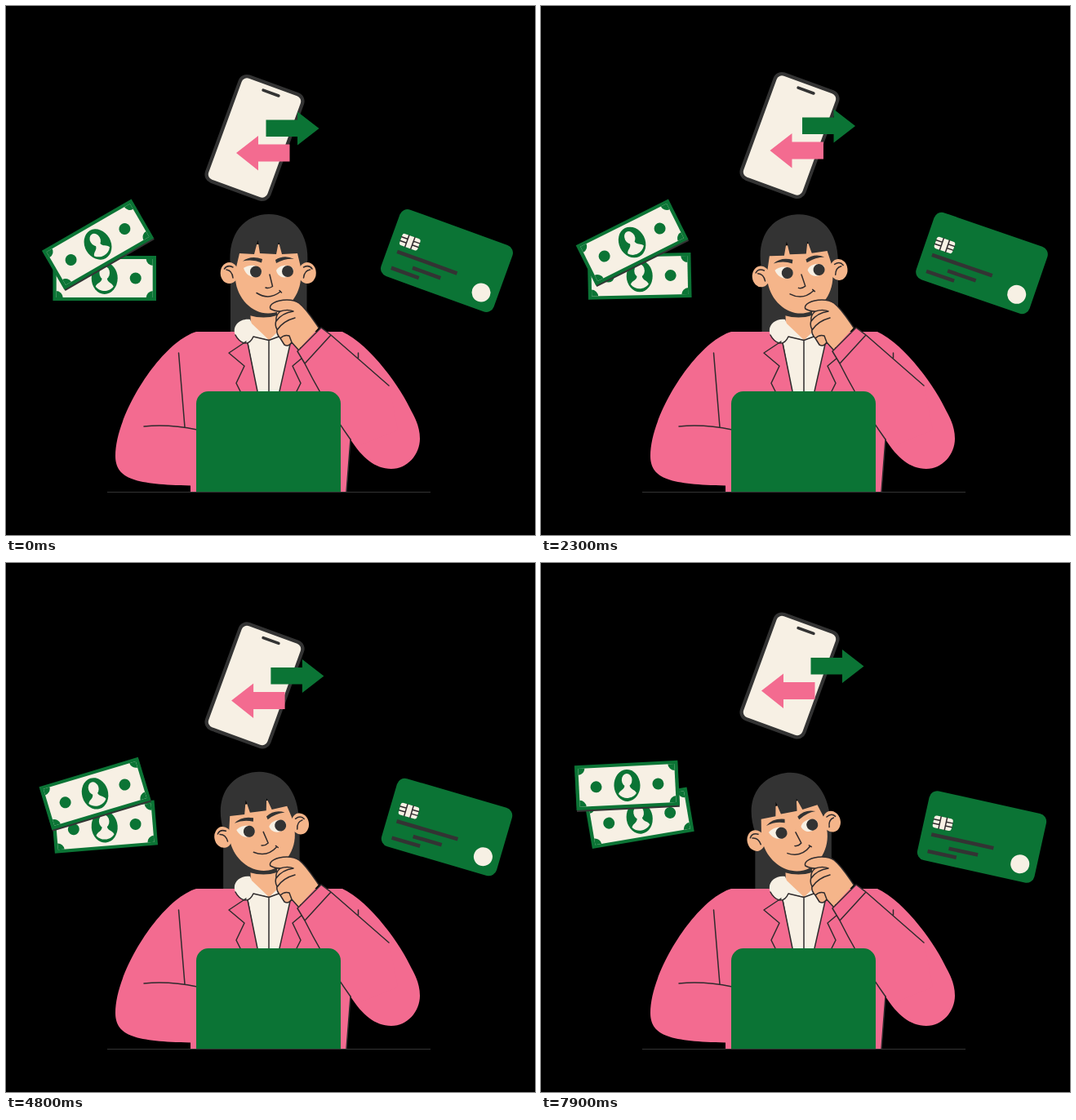
Animation, 648 px wide and 648 px high, one loop 8 s. Source, as an HTML page:

```html
<!DOCTYPE html>
<html lang="en">
<head>
<meta charset="utf-8">
<title>Choosing how to pay</title>
<style>
html, body { margin: 0; width: 100%; height: 100%; overflow: hidden; background: #000; }
svg { display: block; width: 100vw; height: 100vh; }
.green { fill: #0b7435; }
.pink { fill: #f36b90; }
.cream { fill: #f7f0e4; }
.skin { fill: #f5b58a; }
.dark { fill: #333; }
.line { fill: none; stroke: #2f2b2d; stroke-width: 1.5; stroke-linecap: round; stroke-linejoin: round; }
.bar { fill: none; stroke: #333; stroke-width: 4.6; }
</style>
</head>
<body>
<svg viewBox="0 0 648 648">
  <defs>
    <clipPath id="paper"><rect x="-59" y="-23.500" width="118" height="47"/></clipPath>
    <g id="bill">
      <rect class="green" x="-63.300" y="-27.500" width="126.600" height="55"/>
      <rect class="cream" x="-59" y="-23.500" width="118" height="47"/>
      <g class="green">
        <g clip-path="url(#paper)">
          <circle cx="-59.500" cy="-24" r="8.500"/><circle cx="59.500" cy="-24" r="8.500"/>
          <circle cx="-59.500" cy="24" r="8.500"/><circle cx="59.500" cy="24" r="8.500"/>
        </g>
        <circle cx="-38" r="7"/><circle cx="38" r="7"/>
        <ellipse rx="16" ry="19.500"/>
      </g>
      <ellipse class="cream" cy="-6.500" rx="6.300" ry="8"/>
      <path class="cream" d="M-11 10C-9 5-4 6-3 0H3C4 6 9 5 11 10C8 14 4 15.500 0 15.500S-8 14-11 10Z"/>
    </g>
    <g id="ear">
      <ellipse class="skin" cx="273.500" cy="327" rx="10.800" ry="13"/>
      <path class="line" d="M267.500 322Q271 316.500 278 320M270 323Q277 324 278 333"/>
    </g>
  </defs>

  <g id="low"><use href="#bill"/></g>
  <g id="high">
    <rect class="dark" x="-63" y="-25.500" width="126" height="55"/>
    <use href="#bill"/>
  </g>

  <g id="phone">
    <g transform="translate(304.500 161.500) rotate(20)">
      <rect class="dark" x="-42.700" y="-70.300" width="85.400" height="140.600" rx="11"/>
      <rect class="cream" x="-38.400" y="-66" width="76.800" height="132" rx="7"/>
      <path class="bar" d="M-10-58.500H10" style="stroke-width:3.6;stroke-linecap:round"/>
    </g>
  </g>
  <path id="send" class="green" d="M318.500 139.500H357V129.500L383.500 150L357 170.500V160H318.500Z"/>
  <path id="receive" class="pink" d="M347.500 169.500H309V159L282 180L309 201.500V190.500H347.500Z"/>

  <g id="card">
    <rect class="green" x="-73.400" y="-43.300" width="146.800" height="86.600" rx="10"/>
    <rect class="cream" x="-62" y="-13.500" width="23.500" height="15" rx="3"/>
    <path class="line" d="M-62-8.500H-54V-3.500H-62M-38.500-8.500H-46.500V-3.500H-38.500M-54-13.500V1.500M-46.500-13.500V1.500"/>
    <path class="bar" d="M-61 10.300H17M-61 31.500H-25M-36.500 22.600H0"/>
    <circle class="cream" cx="52.800" cy="22.300" r="11.500"/>
  </g>

  <path id="mane" class="dark" d="M275 318H368.500V402H275Z"/>
  <path class="skin" d="M299 370H350V406L322 410L300 390Z"/>
  <path class="dark" d="M294 366L298 379Q316 384 332 379V366Z"/>
  <path class="pink" d="M233 399C190 412 134 500 134 551C134 580 160 586 226 587.500V596H417L422 531C436 553 452 567 472 567C492 567 507 549 507 530C507 517 502 506 497 497C485 470 447 415 412 399H349L335 473H308L294 399Z"/>
  <path class="cream" d="M295 404L303 404L322 409.500L337 395L350 407L335 473H308Z"/>
  <path class="cream" d="M281 403C276 391 288 382 299 384L301 389L322 409L303 405L300 411Q295 415 289 412Z"/>
  <path class="line" d="M281 403Q285 411 292 413Q299 414 303 405L322 409.500L334 405M322 409V472M296 413L308 472M349 410L335 472
    M294 411L273 425L292 441L282 462L287 472M349 411L370 425L351 441L361 462L356 472"/>
  <path class="line" d="M211.500 425L219 516M169 515Q200 512 234 519M422 531L417 595"/>

  <g id="head">
    <path class="skin" d="M281 292V335C283 358 301 376.500 321 376.500C341 376.500 359 358 361 335V292Z"/>
    <path class="dark" d="M275 318C271 278 293 255 322 255S373 278 369 318L361 320L357 303L338 304L334 289L331 304L311 303L308.500 287L304 304L286 303L282 320Z"/>
    <use href="#ear"/>
    <use href="#ear" transform="matrix(-1 0 0 1 642.500 0)"/>
    <path class="dark" d="M290 312.500Q300 305 314 310L313 314.500Q302 309.500 290 312.500ZM330 311Q341 304 353 310Q342 309 331 315Z"/>
    <g id="eyes">
      <path class="cream" d="M291 321C297 316 310 316 313 325C312 334 296 336 291 321ZM331 324C335 316 348 316 352 322C350 335 334 336 331 324Z"/>
      <circle class="dark" cx="306" cy="325.500" r="7"/>
      <circle class="dark" cx="345" cy="325" r="7"/>
    </g>
    <path class="line" d="M323 329L326.500 343.500Q322 346.500 318 345M307 351.500Q322 361 336 350M335 348.500L337.500 351"/>
  </g>

  <path class="skin" d="M324 371C321 366 331 360 344 360Q354 360 359 364C368 371 376 384 383 394L358 421L350 412Q346 418 341 415L336 407Q331 402 332 396Q329 391 331 385Q330 379 336 374Q329 374 324 371Z"/>
  <path class="line" d="M358 421L350 412Q346 418 341 415L336 407Q331 402 332 396Q329 391 331 385Q330 379 336 374Q329 374 324 371C321 366 331 360 344 360Q354 360 359 364C368 371 376 384 383 394M336 374Q345 371 352 374M331 386Q338 376 352 374M332 397Q339 386 354 382M336 407Q341 402 347 404L350 412"/>
  <path class="pink" d="M386 394L398 402L469 465L480 520L430 540L366 438L357 423Z"/>
  <path class="line" d="M398 403L386 394L357 423L366 438L398 403L469 465M366 438C381 468 402 503 422 531M431.500 425V431"/>

  <rect class="green" x="233" y="472" width="177" height="145" rx="15"/>
  <path d="M100 596H540V620H100Z"/>
  <path d="M124 595.500H520" stroke="#333"/>
</svg>
<script>
const LOOP = 8000, STEP = 100, SWING = 11000;
const place = (id, value) => document.getElementById(id).setAttribute("transform", value);
const pose = (x, y, angle) => `translate(${x} ${y}) rotate(${angle})`;

function draw(t) {
  const drift = (1 - Math.cos(Math.PI * t / SWING)) / 2;
  const sway = Math.sin(Math.PI / 2 * t / SWING);
  const lift = -28.8 * drift, slide = 14.7 * drift;

  place("phone", `translate(0 ${lift})`);
  place("send", `translate(${slide} ${lift})`);
  place("receive", `translate(${-slide} ${lift})`);
  place("card", pose(540, 312 - lift, 20 - 9.2 * drift));
  place("low", pose(120.7, 333.5 - 26 * drift, -11.8 * drift));
  place("high", pose(112.5 - 8.6 * drift, 292 - 24 * drift, -30 + 33.2 * drift));
  place("mane", `translate(${-14 * sway} 0)`);
  place("head", `rotate(${-15.7 * sway} 321 374)`);

  // One blink, centred on 3.8 s
  const open = Math.max(0.12, Math.min(1, Math.abs(t - 3800) / 200));
  place("eyes", `translate(0 325) scale(1 ${open}) translate(0 -325)`);
}

function tick(now) {
  draw(Math.floor(now % LOOP / STEP) * STEP);
  requestAnimationFrame(tick);
}
draw(0);
requestAnimationFrame(tick);
</script>
</body>
</html>
```
